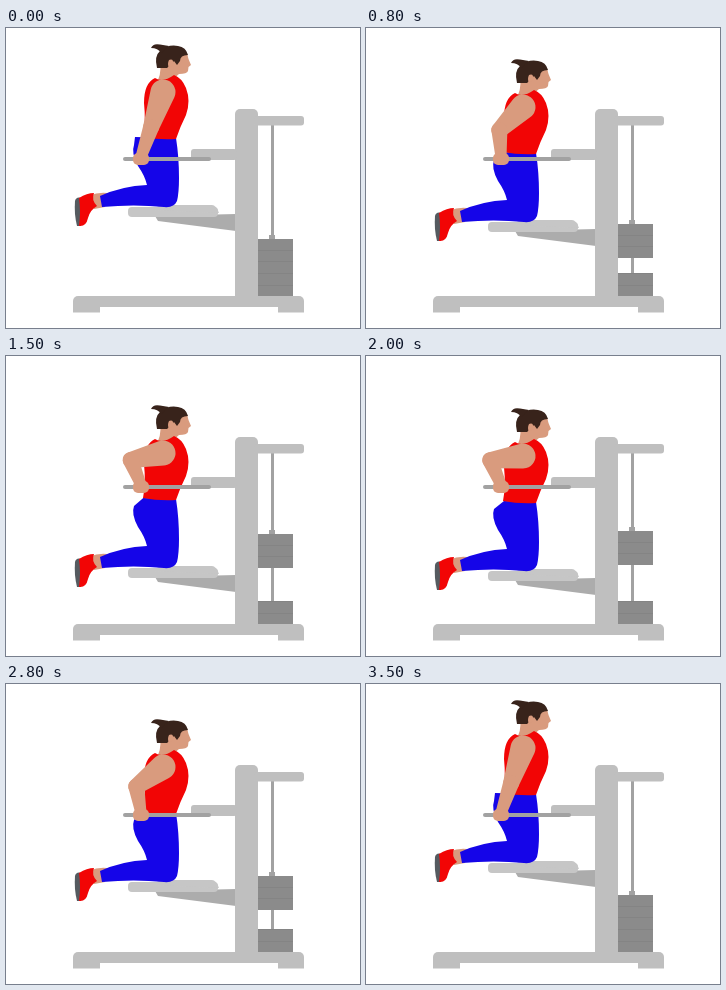
An HTML page with a canvas that plays this animation: 354 by 300 pixels, repeating every 3600 ms.

```html
<!DOCTYPE html>
<html lang="en">
<head>
<meta charset="utf-8">
<title>Assisted dip</title>
<style>
html, body { margin: 0; width: 100%; height: 100%; overflow: hidden; background: #fff; }
canvas { display: block; }
</style>
</head>
<body>
<canvas id="stage" width="354" height="300"></canvas>
<script>
const ctx = document.getElementById('stage').getContext('2d');
const LOOP = 3600, STEP = 100, DEPTH = 35.6;
const SKIN = '#d99b7e', HAIR = '#38231b', RED = '#f20505', BLUE = '#1505e8';
const STEEL = '#bfbfbf', PAD = '#c6c6c6', ROD = '#a2a2a2', WEIGHT = '#8b8b8b';
const HAND = [135, 129], SHOULDER = [157, 64], UPPER = 33, FORE = 27;

const shape = (color, d) => { ctx.fillStyle = color; ctx.fill(new Path2D(d)); };

function box(color, x, y, w, h, r = 0) {
  ctx.fillStyle = color;
  ctx.beginPath();
  ctx.roundRect(x, y, w, h, r);
  ctx.fill();
}

// Tapered limb with round ends
function limb(color, [ax, ay], [bx, by], ra, rb) {
  const dir = Math.atan2(by - ay, bx - ax);
  const spread = Math.acos((ra - rb) / Math.hypot(bx - ax, by - ay));
  ctx.fillStyle = color;
  ctx.beginPath();
  ctx.arc(ax, ay, ra, dir + spread, dir - spread);
  ctx.arc(bx, by, rb, dir - spread, dir + spread);
  ctx.fill();
}

const ease = u => (1 - Math.cos(Math.PI * Math.min(1, Math.max(0, u)))) / 2;
const drop = t => Math.round(DEPTH * (ease(t / 1800) - ease((t - 2050) / 1550)));

function seat() {
  shape('#acacac', 'M149 188 L230 186 V203 L152 193 Z');
  box(PAD, 122, 179, 90, 10, 4);
  shape(PAD, 'M147 182 Q152 177 158 177 H206 Q210 177 213 185 Z');
}

function weights(d) {
  box(ROD, 265, 97, 3, 150);
  box(ROD, 263, 207 - d, 6, 5);
  box(WEIGHT, 252, 211 - d, 35, 34);
  box(WEIGHT, 252, 245, 35, 24);
  for (const y of [222 - d, 233 - d, 245, 257]) box('#848484', 252, y, 35, 1);
}

function frame() {
  box(STEEL, 67, 268, 231, 11, [5, 5, 0, 0]);
  box(STEEL, 67, 274, 27, 10.5);
  box(STEEL, 272, 274, 26, 10.5);
  box(STEEL, 229, 81, 23, 189, [5, 5, 0, 0]);
  box(STEEL, 248, 88, 50, 9.5, 3);
  box(STEEL, 185, 121, 46, 11, 3);
}

// The back of the waist moves in as the hips sink
function body(waist) {
  // Foot and shoe
  shape(SKIN, 'M83 168 Q92 164 101 165 L99 179 L88 181 Z');
  shape('#555b60', 'M69 173 Q70 168 76 170 L75 198 H71 Q68 186 69 173 Z');
  shape(RED, 'M73 170 Q81 165 88 165 Q85 172 91 178 Q84 182 82 190 Q80 199 73 198 Q75 184 73 170 Z');
  // Legs
  shape(BLUE, `M${waist} 109 L170 110 Q173 129 173 150 Q173 165 171 173 Q168 180 158 179 ` +
    'Q128 176 96 179 L94 168 Q116 158 141 157 Q139 148 132 138 Q125 125 128 117 Z');
  // Neck and face
  shape(SKIN, 'M154 34 L164 24 L181 25 Q182 31 185 37 L182.5 39 L182 43 Q181 46 173 46 ' +
    'Q169 48 168 56 L149 57 Q156 48 154 34 Z');
  // Hair with a tied tail
  shape(HAIR, 'M151 40 Q148 28 154 23 Q162 16 172 18 Q180 19 182 27 Q174 27 174 33 L171 37 L168 33 L161 40 Z');
  shape(HAIR, 'M145 20 Q147 15 154 16.5 L163 18 L155 25 Q152 20 145 20 Z');
  shape(SKIN, 'M163 32 Q168 30 167 37 L163 40 Q161 36 163 32 Z');
  // Top
  shape(RED, 'M138 75 Q138 55 149 50 Q157 55 168 47 Q176 50 180 60 Q185 73 180 87 ' +
    'Q174 99 170 111 Q153 112 137 109 Q140 94 138 75 Z');
}

function arm(d) {
  const [sx, sy] = [SHOULDER[0], SHOULDER[1] + d];
  const span = Math.hypot(sx - HAND[0], sy - HAND[1]);
  const ux = (sx - HAND[0]) / span, uy = (sy - HAND[1]) / span;
  const along = (FORE ** 2 - UPPER ** 2 + span ** 2) / (2 * span);
  const bend = Math.sqrt(Math.max(0, FORE ** 2 - along ** 2));
  const elbow = [HAND[0] + ux * along + uy * bend, HAND[1] + uy * along - ux * bend];
  limb(SKIN, [sx, sy], elbow, 12.5, 8);
  limb(SKIN, elbow, HAND, 8, 5.5);
  box(SKIN, 127, 125, 16, 12, 5);
}

function draw(time) {
  const d = drop(Math.floor(time % LOOP / STEP) * STEP);
  const lowered = (part, ...args) => {
    ctx.save();
    ctx.translate(0, d);
    part(...args);
    ctx.restore();
  };
  box('#fff', 0, 0, 354, 300);
  weights(d);
  lowered(seat);
  frame();
  lowered(body, 129 + d / 4);
  box(ROD, 117, 129, 88, 4, 2);
  arm(d);
}

const start = performance.now();
function loop() {
  draw(performance.now() - start);
  requestAnimationFrame(loop);
}
loop();
</script>
</body>
</html>
```
